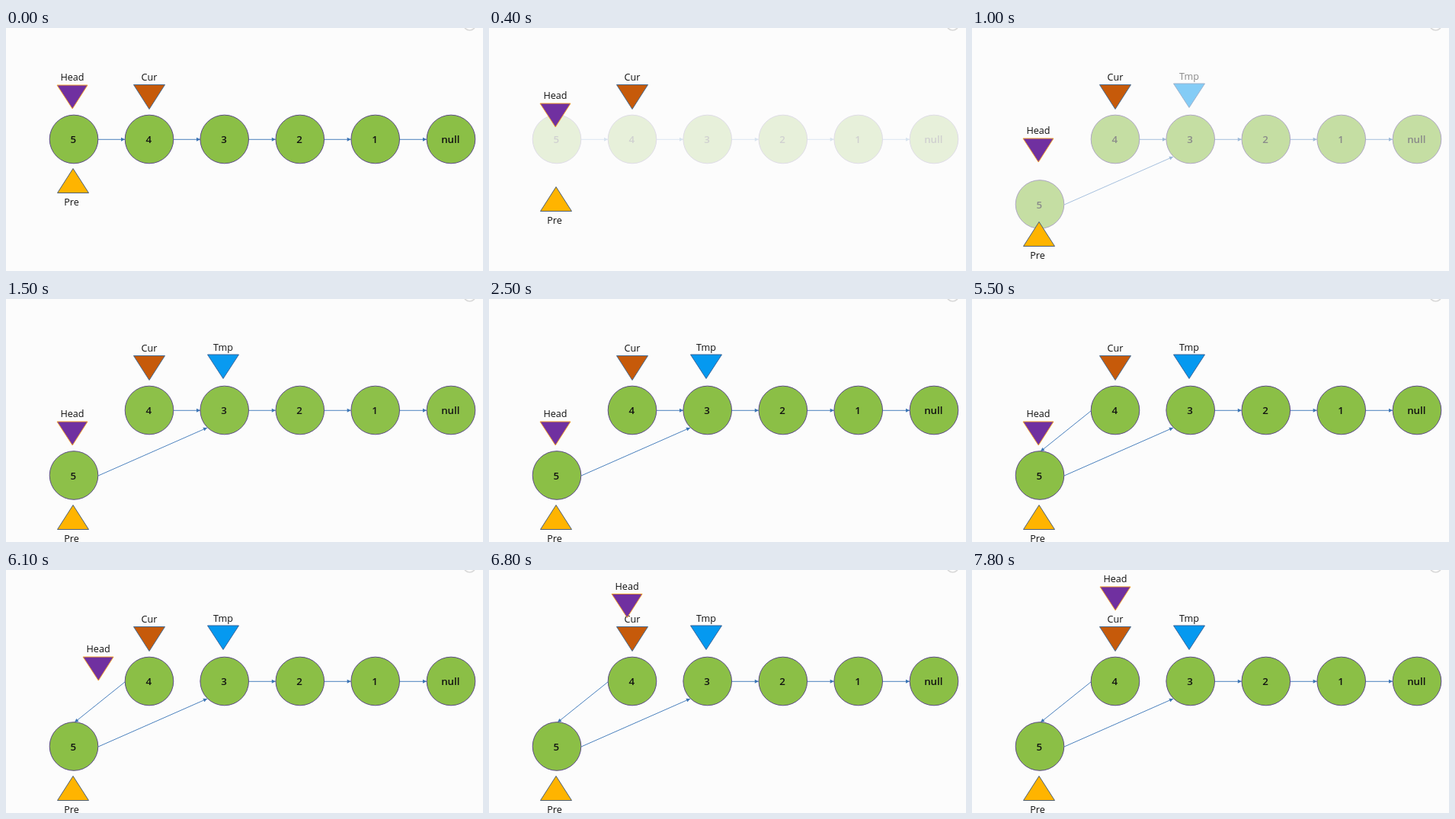
Write an HTML page that moves like this. It is 626 px wide and 319 px high and loops after 8 s.

```html
<!DOCTYPE html>
<html lang="en">
<head>
<meta charset="utf-8">
<title>Linked list reversal</title>
<style>
html, body { margin: 0; width: 100%; height: 100%; overflow: hidden; background: #fcfcfc; }
svg { display: block; width: 100vw; height: 100vh; }
text { font-family: "Open Sans", "Noto Sans", sans-serif; font-size: 12.6px; text-anchor: middle; fill: #111; }
.node text { font-size: 13.3px; font-weight: 600; }
.node circle { fill: #8bbf46; stroke: #5b4a86; }
.link { fill: none; stroke: #4a80bd; }
.tip { fill: #3b74b5; }
</style>
</head>
<body>
<svg id="stage" viewBox="0 0 626 319" xmlns="http://www.w3.org/2000/svg">
  <circle cx="608.5" cy="-5" r="8" fill="none" stroke="#d9d9d9" stroke-width="1.6"/>
</svg>
<script>
const LOOP = 8000;
const stage = document.getElementById('stage');
const columns = [89, 188, 286.7, 385.8, 484.7, 584];
const names = ['5', '4', '3', '2', '1', 'null'];

function add(parent, tag, attrs, content) {
  const el = document.createElementNS('http://www.w3.org/2000/svg', tag);
  for (const key in attrs) el.setAttribute(key, attrs[key]);
  if (content) el.textContent = content;
  parent.append(el);
  return el;
}

function addLink(parent, x1, y1, x2, y2) {
  const angle = Math.atan2(y2 - y1, x2 - x1) * 180 / Math.PI;
  add(parent, 'path', { class: 'link', d: `M${x1} ${y1}L${x2} ${y2}` });
  add(parent, 'path', { class: 'tip', d: 'M0 0L-5 -2.5V2.5Z',
    transform: `translate(${x2} ${y2}) rotate(${angle})` });
}

function addList(firstY, firstLinks) {
  const group = add(stage, 'g', {});
  firstLinks.forEach(link => addLink(group, ...link));
  for (let i = 2; i < 5; i++) addLink(group, columns[i] + 32, 146.3, columns[i + 1] - 32, 146.3);
  columns.forEach((x, i) => {
    const y = i ? 146 : firstY;
    const node = add(group, 'g', { class: 'node' });
    add(node, 'circle', { cx: x, cy: y, r: 31.8 });
    add(node, 'text', { x: x - 0.7, y: y + 5 }, names[i]);
  });
  return group;
}

function addMarker(label, labelX, labelY, points, fill, stroke) {
  const group = add(stage, 'g', {});
  add(group, 'polygon', { points, fill, stroke });
  add(group, 'text', { x: labelX, y: labelY }, label);
  return group;
}

const forward = [121, 146.3, 156, 146.3];
const second = [220, 146.3, 255, 146.3];
const skip = [121, 232, 264, 169];
const back = [156, 147, 90, 200];
const lists = [
  addList(146, [forward, second]),
  addList(231.5, [skip, second]),
  addList(231.5, [skip, back])
];

const cur = addMarker('Cur', 188, 69, '167.5,74.5 208.5,74.5 188,106.5', '#c65a0a', '#46688c');
const tmp = addMarker('Tmp', 285, 67.5, '264.5,73 305.5,73 285,104.5', '#0599f0', '#39659a');
const pre = addMarker('Pre', 86, 233, '88,184.5 67.5,216.5 108.5,216.5', '#ffb400', '#4d6078');
const head = addMarker('Head', 87, 69, '67,75 107,75 87.2,106', '#7030a0', '#f0a030');

const clamp = v => Math.max(0, Math.min(1, v));
const fadeOut = t => 1 - clamp(t / 490);
const fadeIn = t => clamp((t - 520) / 1000);

// Short acceleration, steady speed, longer deceleration.
function glide(t) {
  const up = 174, down = 420, end = 1420;
  const speed = 1 / (end - (up + down) / 2);
  if (t <= 0) return 0;
  if (t >= end) return 1;
  if (t < up) return speed * t * t / (2 * up);
  if (t < end - down) return speed * (t - up / 2);
  return 1 - speed * (end - t) ** 2 / (2 * down);
}

const shift = (el, x, y) => el.setAttribute('transform', `translate(${x} ${y})`);
const fade = (el, value) => el.setAttribute('opacity', value);

function draw(t) {
  const relinkTime = t - 2800;
  const headTime = t - 5635;
  const drop = 86 * glide(t);
  const advance = glide(headTime);
  shift(pre, 0, drop);
  shift(head, 101 * advance, drop - 139 * advance);
  fade(tmp, fadeIn(t));
  fade(lists[0], fadeOut(t));
  fade(lists[1], fadeIn(t) * fadeOut(relinkTime));
  fade(lists[2], fadeIn(relinkTime));
}

const start = performance.now();
function tick() {
  draw((performance.now() - start) % LOOP);
  requestAnimationFrame(tick);
}
draw(0);
requestAnimationFrame(tick);
</script>
</body>
</html>
```
